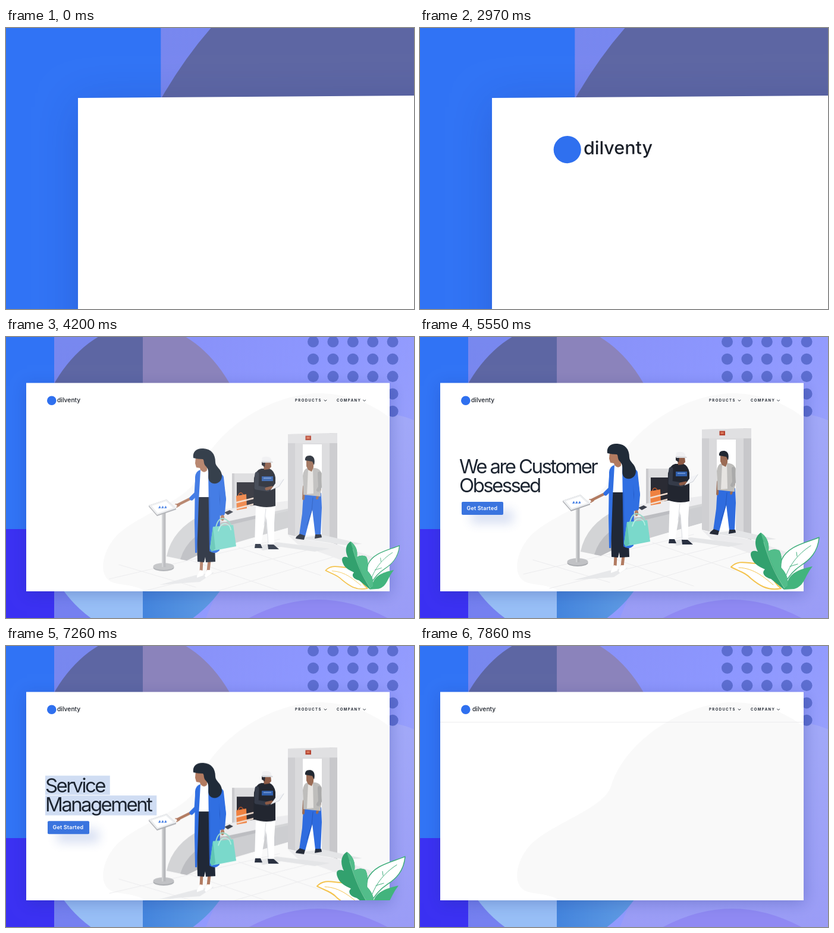
An HTML page with a canvas for the animation above (8 s loop, 686 by 474 pixels).

```html
<!DOCTYPE html>
<html lang="en">
<head>
<meta charset="utf-8">
<title>Landing page reveal</title>
<style>
html, body { margin: 0; width: 100%; height: 100%; overflow: hidden; background: #3073f5; }
canvas { display: block; width: 686px; height: 474px; }
</style>
</head>
<body>
<canvas id="stage"></canvas>
<script>
const W = 686, H = 474, LOOP = 8000;
const CARD = { x: 34, y: 77.5, w: 611, h: 351.5 };
const FONT = 'Inter, "Open Sans", sans-serif';
const BRAND = 'dilventy';
const HEADS = [['We are Customer', 'Obsessed'], ['Service', 'Management']];
const ratio = window.devicePixelRatio || 1;
const stage = document.getElementById('stage');
const ctx = prepare(stage);

function prepare(canvas) {
  canvas.width = Math.round(W * ratio);
  canvas.height = Math.round(H * ratio);
  const c = canvas.getContext('2d');
  c.scale(ratio, ratio);
  return c;
}

// Easing
const span = (t, a, b) => Math.min(1, Math.max(0, (t - a) / (b - a)));
const outCubic = p => 1 - (1 - p) ** 3;
const outBack = p => 1 + 2.2 * (p - 1) ** 3 + 1.2 * (p - 1) ** 2;
const inOutQuart = p => p < .5 ? 8 * p ** 4 : 1 - 8 * (1 - p) ** 4;
const mix = (a, b, p) => a + (b - a) * p;

// Drawing helpers
function fill(c, color, d) {
  c.fillStyle = color;
  c.fill(new Path2D(d));
}
function line(c, color, width, d) {
  c.strokeStyle = color;
  c.lineWidth = width;
  c.lineCap = c.lineJoin = 'round';
  c.stroke(new Path2D(d));
}
function rect(c, color, x, y, w, h) {
  c.fillStyle = color;
  c.fillRect(x, y, w, h);
}
function oval(c, color, x, y, rx, ry = rx) {
  c.fillStyle = color;
  c.beginPath();
  c.ellipse(x, y, rx, ry, 0, 0, Math.PI * 2);
  c.fill();
}
function text(c, str, x, y, size, weight, color, spacing = 0) {
  c.font = `${weight} ${size}px ${FONT}`;
  c.letterSpacing = spacing + 'px';
  c.fillStyle = color;
  c.fillText(str, x, y);
}
function gradient(c, x0, y0, x1, y1, ...colors) {
  const g = c.createLinearGradient(x0, y0, x1, y1);
  colors.forEach((col, i) => g.addColorStop(i / (colors.length - 1), col));
  return g;
}

function backdrop(c) {
  rect(c, gradient(c, 230, 0, 690, 300, '#8790f7', '#8d97ff', '#9ba2fb'), 230, -10, 470, 500);
  fill(c, gradient(c, 0, 140, 0, 474, '#a1a8f8', '#9a9cf6'),
    'M700 147 Q660 125 610 128 Q420 250 330 490 L700 490Z');
  fill(c, '#8f89f3', 'M405 476 Q525 410 645 476Z');
  rect(c, gradient(c, 0, 0, 0, 474, '#7888ef', '#747ff0'), 81, -10, 149, 500);
  rect(c, '#3073f5', -10, -10, 91, 334);
  rect(c, '#3a30f2', -10, 324, 91, 170);

  c.save();
  c.beginPath();
  c.ellipse(228.5, 241, 188, 262, 0, 0, Math.PI * 2);
  c.clip();
  rect(c, '#5d66a3', 81, -30, 149, 354);
  rect(c, '#8b83bb', 230, -30, 200, 354);
  rect(c, '#97bef6', 81, 324, 149, 190);
  rect(c, gradient(c, 230, 0, 365, 0, '#4384dd', '#619de4'), 230, 324, 200, 190);
  c.restore();

  for (let i = 0; i < 25; i++)
    oval(c, '#5c6dd0', 516.5 + (i % 5) * 33.4, 8 + Math.floor(i / 5) * 29.3, 9.5);
}

function card(c, scale) {
  c.save();
  c.shadowColor = 'rgba(30,45,130,.28)';
  c.shadowBlur = 24 * scale * ratio;
  c.shadowOffsetX = 2 * scale * ratio;
  c.shadowOffsetY = 5 * scale * ratio;
  rect(c, '#fff', CARD.x, CARD.y, CARD.w, CARD.h);
  c.restore();
}

function blob(c) {
  fill(c, '#f9f9f9', 'M525 95 C440 97 345 160 321 237 C309 274 225 298 187 334 ' +
    'C160 363 155 402 177 413 C195 420 212 416 235 429 L645 429 L645 136 C612 110 570 95 525 95Z');
}

function kiosk(c) {
  oval(c, '#a9abaf', 265, 381, 17.5, 6);
  oval(c, '#c1c2c5', 265, 379, 17.5, 6);
  rect(c, '#b7b8bb', 262, 286, 6.5, 94);
  rect(c, '#d0d1d3', 262, 286, 2.5, 94);
  fill(c, '#aaacb1', 'M240 276 L270 266 L286 281 L286 283 L254 294 L240 278Z');
  fill(c, '#eceef0', 'M240 276 L270 266 L286 281 L254 292Z');
  fill(c, '#fff', 'M245 277 L269 269 L281 280 L255 289Z');
  for (let i = 0; i < 3; i++)
    fill(c, '#3f7be4', `M${256 + i * 5} 281 l2.5 -4.5 l2 4Z`);
}

function desk(c) {
  rect(c, '#dcdcde', 380, 222, 63, 66);
  rect(c, '#cacacd', 380, 222, 4, 66);
  rect(c, '#2a2b34', 388, 237, 37, 44);
  fill(c, '#d3d4d6', 'M270 362 Q279 316 331 291 L440 272 L476 273 L476 313 L420 329 L355 344 L304 369Z');
  fill(c, '#bcbdc1', 'M293 367 Q306 323 366 304 L420 291 L420 329 L355 344 L304 369Z');
  fill(c, '#cdced1', 'M326 357 Q335 326 372 310 L476 285 L476 313 L420 329Z');
  fill(c, '#ececee', 'M318 298 Q330 287 380 281 L476 268 L476 281 L368 304 Q338 298 318 298Z');
  fill(c, '#3a3f4b', 'M367 288 L376 284 L382 287 L373 292Z');
  line(c, '#b95428', 1.5, 'M390 261 Q394 249 400 260');
  fill(c, '#ef8140', 'M387 260 L404 257 L405 281 L388 284Z');
  line(c, '#f2ddcf', 2.5, 'M388 271 L416 264 M389 281 L416 274');
}

function gate(c) {
  fill(c, '#ececee', 'M474 326 L500 333 L557 342 L640 371 L598 381 L490 341Z');
  rect(c, '#fff', 499, 170, 34, 156);
  fill(c, '#dadadc', 'M474 156 L557 154 L557 342 L531 335 L531 173 L499 173 L499 331 L474 325Z');
  fill(c, '#cfcfd2', 'M474 156 L486 156 L486 328 L474 325Z');
  fill(c, '#c8c8cb', 'M544 154 L557 154 L557 342 L544 338Z');
  fill(c, '#e0e0e2', 'M474 156 L557 154 L557 171 L474 171Z');
  rect(c, '#b54432', 503.5, 158.5, 9.5, 7.5);
  rect(c, '#df8060', 505.5, 160.5, 5, 3);
}

function guard(c) {
  fill(c, '#e4e5e7', 'M419 345 L455 338 L545 349 L519 354 L462 346 L432 352Z');
  fill(c, '#fff', 'M420 274 L453 274 L451 306 L451 343 L441 343 L437 294 L429 342 L418 342Z');
  line(c, '#dadce1', 1, 'M437 281 L434 309 M441 342 L438 300');
  fill(c, '#293040', 'M419 341 L428 341 L431 348 L418 348Z M440 342 L450 342 L459 350 L441 350Z');
  fill(c, '#222630', 'M429 214 Q420 216 417 230 L416 275 Q436 282 453 277 L453 229 Q451 217 443 214Z');
  line(c, '#353b49', 7, 'M422 223 L421 246 L440 249');
  rect(c, '#305fac', 430, 227, 19, 8);
  rect(c, '#6a91d1', 433, 229, 13, 2);
  line(c, '#8d5b46', 5, 'M438 248 L447 246');
  fill(c, '#8d5b46', 'M432 202 L445 201 L446 211 L442 215 L434 216Z');
  fill(c, '#292a32', 'M430 201 L436 203 L435 211 L430 208Z');
  fill(c, '#f0f0f2', 'M430 203 L431 195 Q439 192 445 196 L447 202Z');
  fill(c, '#d6d8dc', 'M430 201 L448 202 L449 204 L431 204Z');
  fill(c, '#f2f3f6', 'M445 250 L455 236 L467 232 L459 244Z');
  line(c, '#c3c7cf', .8, 'M445 250 L459 244 L467 232');
}

function visitor(c) {
  fill(c, '#e4e5e7', 'M491 331 L533 326 L599 341 L570 343Z');
  fill(c, '#2f6cdf', 'M500 255 L530 255 L531 280 L529 326 L520 326 L515 283 L503 328 L493 326 L498 290Z');
  line(c, '#2458bd', 1, 'M516 263 L514 285 L506 309');
  fill(c, '#252b38', 'M494 324 L503 327 L501 334 L487 332 L488 329Z M520 325 L530 325 L531 330 L519 332Z');
  line(c, '#9b6c55', 4, 'M501 244 L500 265 M528 249 L523 264');
  fill(c, '#bebdbb', 'M507 213 Q500 215 499 226 L500 258 L529 261 L531 222 Q528 214 520 213Z');
  fill(c, '#e6e4e1', 'M508 214 L516 214 L517 256 L506 257Z');
  line(c, '#aaaaaa', 6, 'M527 222 L528 245 L525 250');
  fill(c, '#9b6c55', 'M505 199 L517 200 L517 212 L514 219 L508 216 L505 210Z');
  fill(c, '#222832', 'M503 200 Q502 191 512 192 Q521 194 518 208 L515 202Z');
}

function shopper(c) {
  fill(c, '#e7e8ea', 'M318 394 L350 389 L326 405 L258 410Z');
  line(c, '#b27b61', 5, 'M329 368 L328 388 M342 368 L340 387');
  fill(c, '#fff', 'M326 385 L332 386 L332 394 L321 398 L321 395Z M338 385 L345 385 L346 391 L336 398 L334 395Z');
  fill(c, '#202837', 'M323 257 L348 257 L352 371 L336 372 L335 363 L333 372 L322 371 L320 300Z');
  fill(c, '#fff', 'M324 216 L341 214 L345 262 L324 262Z');
  fill(c, '#306fe2', 'M340 214 Q360 214 365 228 L370 267 L360 284 L359 352 Q351 360 342 353 Z');
  fill(c, '#306fe2', 'M327 216 Q319 218 318 228 L317 304 L318 356 L321 356 L324 270Z');
  line(c, '#2458c2', 1.2, 'M342 262 L343 353 M359 240 L360 285');
  line(c, '#b27b61', 4.5, 'M315 262 L289 275');
  line(c, '#b27b61', 1.6, 'M292 274 L285 274 M292 276 L287 279');
  line(c, '#306fe2', 7, 'M322 229 L320 256 L312 264');
  line(c, '#306fe2', 10, 'M361 229 L365 266 L363 289');
  oval(c, '#b27b61', 364, 297, 3.2, 5);
  fill(c, '#b27b61', 'M319 194 L338 193 L338 217 Q333 223 327 216 L326 213 L320 212 L318 205Z');
  fill(c, '#202b38', 'M315 196 C313 184 322 179 332 180 C345 181 352 189 352 203 ' +
    'C352 211 362 214 363 225 C364 238 350 243 343 236 C337 229 344 220 337 211 ' +
    'C331 206 334 200 331 198 Q322 198 315 196Z');
  line(c, '#9ddacb', 2, 'M353 313 Q356 298 365 298 Q377 301 379 313');
  fill(c, '#7ad9cb', 'M348 312 L382 309 L387 345 L346 353 L343 348Z');
  fill(c, '#5fc5b5', 'M348 312 L352 349 L346 354 L343 349Z');
  line(c, '#b5eee2', 1.8, 'M357 319 Q361 305 370 307 Q377 309 378 317');
}

function scene(c) {
  line(c, '#ebebed', 1,
    'M174 400 L460 333 M218 424 L545 342 M330 428 L588 352 M190 376 L319 414 M285 360 L460 420 M391 347 L529 394');
  desk(c);
  gate(c);
  visitor(c);
  guard(c);
  kiosk(c);
  shopper(c);
}

function leaves(c) {
  const yellow = 'M523 388 C536 374 552 383 570 382 C590 385 587 409 607 424 C584 429 569 418 556 407 C547 397 536 395 523 388Z';
  fill(c, '#fff', yellow);
  line(c, '#f4c34d', 2, yellow);
  line(c, '#f4c34d', 1, 'M536 389 C563 390 580 407 594 418');
  const pale = 'M671 338 C650 347 618 352 608 376 C606 384 606 391 608 400 L613 415 ' +
    'C621 404 626 395 641 385 C655 376 669 363 671 338Z';
  fill(c, '#fff', pale);
  line(c, '#40ae7c', 1.5, pale);
  line(c, '#40ae7c', 1, 'M657 352 C634 367 620 386 612 412 M634 370 L633 363 M622 387 L635 383');
  fill(c, '#42b47d', 'M660 387 C645 390 626 395 619 410 L612 426 L629 425 C647 420 646 404 660 387Z');
  fill(c, '#32a16e', 'M573 330 C561 338 563 352 568 362 C558 358 553 363 558 374 ' +
    'C562 384 572 388 580 392 C574 397 578 405 590 408 L612 426 L618 420 ' +
    'C620 405 614 396 606 388 C609 376 608 366 604 360 Q595 356 586 361 C588 346 582 336 573 330Z');
  fill(c, '#52bd8a', 'M586 361 C588 346 582 336 573 330 C580 356 592 388 612 425 L618 420 ' +
    'C620 405 614 396 606 388 C609 376 608 366 604 360 Q595 356 586 361Z');
  line(c, '#8bd3ad', .8, 'M578 346 C585 372 597 402 613 424');
}

const art = document.createElement('canvas');
scene(prepare(art));

function brand(c, t) {
  const pop = outBack(span(t, 720, 1450));
  if (pop > 0) oval(c, '#2f70ef', 76.8, 107.2, 7.8 * pop);
  const show = outCubic(span(t, 1530, 1920));
  if (!show) return;
  c.save();
  c.beginPath();
  c.rect(85.2, 95, 60, 25);
  c.clip();
  c.globalAlpha = show;
  const shift = 2 * span(t, 7680, 7860);
  text(c, BRAND, mix(74, 86, show) + shift, 110, 10.3, 500, '#1b2029');
  c.restore();
}

function nav(c, t) {
  c.globalAlpha = span(t, 3920, 4170);
  [['PRODUCTS', 486, 537], ['COMPANY', 556, 602.5]].forEach(([label, x, tip]) => {
    text(c, label, x, 109.2, 6, 700, '#262c36', 1.4);
    line(c, '#262c36', 1, `M${tip - 2} 106.2 l2 2 l2 -2`);
  });
  c.globalAlpha = span(t, 7650, 7820);
  rect(c, '#ececee', CARD.x, 128, CARD.w, 1);
  c.globalAlpha = 1;
}

// Types the given number of characters; mark is how much of the lines is selected.
function headline(c, lines, count, mark) {
  const size = 33, weight = 400, spacing = -2.6;
  lines.forEach((str, i) => {
    const base = 229.5 + i * 32.5;
    const part = str.slice(0, Math.max(0, count));
    count -= str.length;
    c.font = `${weight} ${size}px ${FONT}`;
    c.letterSpacing = spacing + 'px';
    const wide = c.measureText(str).width + 9;
    const row = span(mark, i / 2, (i + 1) / 2);
    rect(c, '#d0ddf3', 66, base - 28 + i, wide * row, 32.5 + i);
    text(c, part, 66, base, size, weight, '#1d2531', spacing);
  });
}

function button(c) {
  c.save();
  c.shadowColor = 'rgba(50,90,190,.2)';
  c.shadowBlur = 18 * ratio;
  c.shadowOffsetX = 16 * ratio;
  c.shadowOffsetY = 14 * ratio;
  c.fillStyle = '#3a74df';
  c.beginPath();
  c.roundRect(70, 278, 70, 22, 2);
  c.fill();
  c.restore();
  text(c, 'Get Started', 78.5, 292.2, 9, 600, '#fff', .2);
}

function content(c, t) {
  const enter = outCubic(span(t, 3950, 4500));
  if (!enter) return;
  const drop = 75 * span(t, 6950, 7600) ** 2;
  const gone = 1 - span(t, 7290, 7620);

  c.save();
  c.beginPath();
  c.rect(CARD.x, CARD.y, CARD.w, CARD.h);
  c.clip();
  c.globalAlpha = span(t, 3950, 4230) * gone;
  c.drawImage(art, 0, 50 * (1 - enter) + drop, W, H);

  const rise = outCubic(span(t, 4320, 4850));
  c.globalAlpha = rise * gone;
  c.translate(0, 16 * (1 - rise) + drop);
  if (rise * gone > 0) {
    if (t < 6020) headline(c, HEADS[0], 99, outCubic(span(t, 5700, 5940)));
    else headline(c, HEADS[1], Math.floor(17 * span(t, 6020, 6660)), outCubic(span(t, 6900, 7160)));
    button(c);
  }
  c.restore();

  // Leaves may overhang the right side of the card but not its bottom.
  c.save();
  c.beginPath();
  c.rect(0, 0, W + 10, CARD.y + CARD.h);
  c.clip();
  c.globalAlpha = gone;
  c.translate(612, 424 + drop);
  c.scale(enter, enter);
  c.translate(-612, -424);
  leaves(c);
  c.restore();
}

function draw(t) {
  const zoom = 1 - inOutQuart(span(t, 3000, 4160));
  const scale = 1 + 1.96 * zoom;
  ctx.clearRect(0, 0, W, H);
  ctx.save();
  ctx.transform(scale, -.0071 * scale * zoom, 0, scale, 20.4 * zoom, -110.6 * zoom);
  backdrop(ctx);
  card(ctx, scale);
  ctx.globalAlpha = span(t, 3920, 4200);
  blob(ctx);
  ctx.globalAlpha = 1;
  content(ctx, t);
  nav(ctx, t);
  brand(ctx, t);
  ctx.restore();
}

const start = performance.now();
function tick() {
  draw((performance.now() - start) % LOOP);
  requestAnimationFrame(tick);
}
draw(0);
requestAnimationFrame(tick);
</script>
</body>
</html>
```
